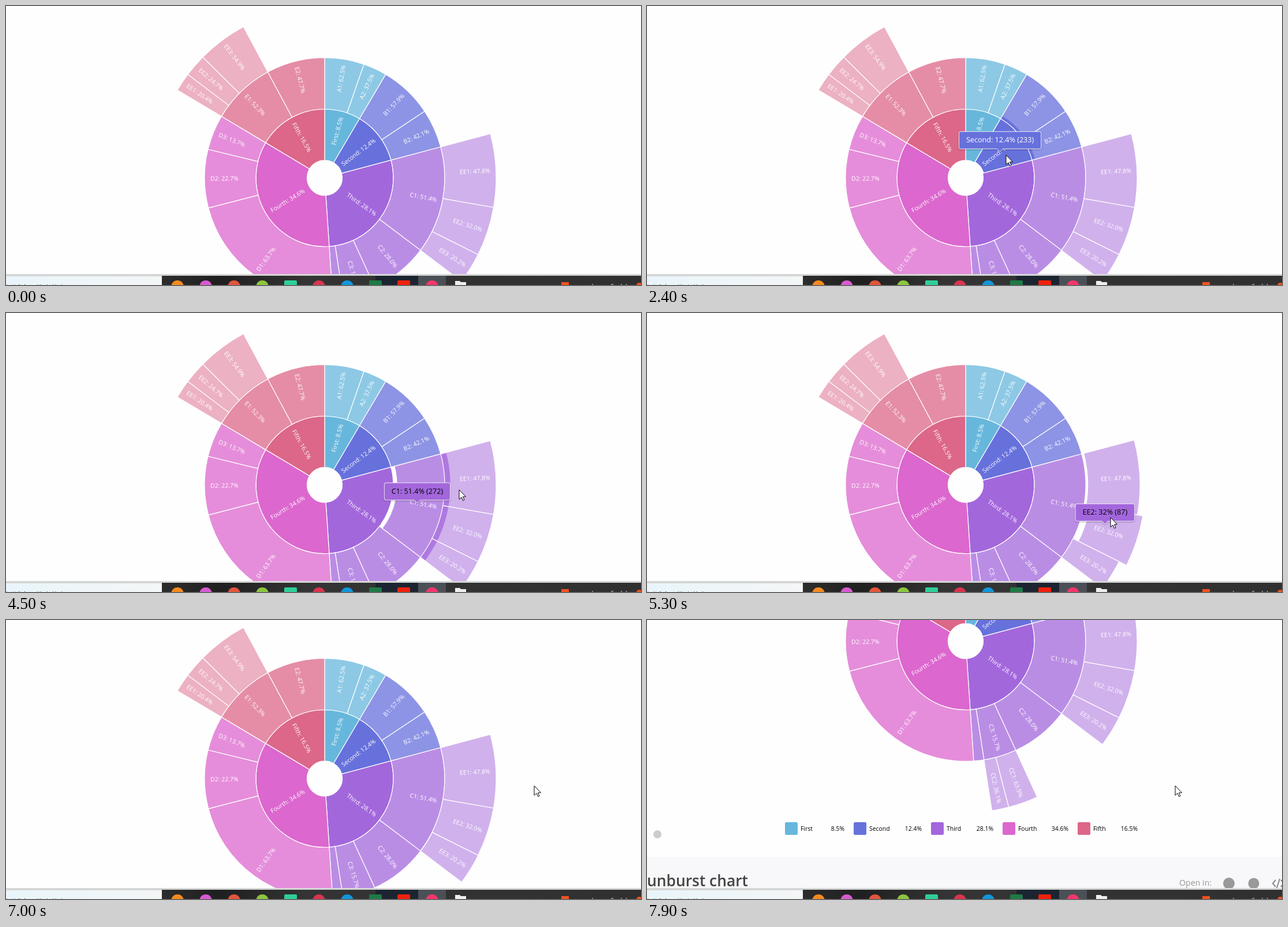
Animation of 1100x483 px, one loop 8 s. Source, as an HTML page:

```html
<!DOCTYPE html>
<html lang="en">
<head>
<meta charset="utf-8">
<title>Sunburst chart</title>
<style>
html, body { margin: 0; width: 100%; height: 100%; overflow: hidden; background: #fefefe; }
svg { display: block; width: 100%; height: 100%; font-family: "Open Sans", "Noto Sans", sans-serif; }
.slice { stroke: #fff; stroke-width: 1.2; }
.label { fill: #fff; font-size: 10.5px; }
.legend { fill: #000; font-size: 10.4px; }
.tip { font-size: 12.6px; text-anchor: middle; }
.tip path { stroke: #fff; stroke-opacity: .9; filter: drop-shadow(0 1px 1px rgba(0, 0, 0, .3)); }
.title { font-size: 26.4px; font-weight: 600; fill: #444; text-anchor: end; }
.open { font-size: 14.2px; fill: #999; }
.task { font: 13px "Noto Sans CJK SC", "Noto Sans CJK", sans-serif; fill: #222; }
</style>
</head>
<body>
<svg id="stage" viewBox="0 0 1100 483">
  <defs>
    <linearGradient id="bar">
      <stop offset="0" stop-color="#2d2d2d"/><stop offset=".12" stop-color="#1f1f1f"/>
      <stop offset=".3" stop-color="#343434"/><stop offset="1" stop-color="#303030"/>
    </linearGradient>
    <linearGradient id="pane">
      <stop offset="0" stop-color="#e9f5fa"/><stop offset="1" stop-color="#f4f6f7"/>
    </linearGradient>
  </defs>
  <g id="page">
    <g id="footer">
      <rect y="671" width="1100" height="200" fill="#f8f7f9"/>
      <text class="title" x="175" y="722">Sunburst chart</text>
      <text class="open" x="922" y="721">Open in:</text>
      <circle cx="1008" cy="717" r="10" fill="#999"/>
      <circle cx="1051" cy="717" r="9.5" fill="#999"/>
      <path d="M1089 711l-5 6 5 6M1096 709l-5 16M1098 711l5 6-5 6" fill="none" stroke="#888" stroke-width="2"/>
    </g>
    <circle cx="18" cy="632" r="7" fill="#ccc"/>
    <g id="legend"></g>
    <g id="rings"></g>
    <g id="labels"></g>
    <g id="tips"></g>
  </g>
  <g id="taskbar">
    <rect y="464" width="1100" height="19" fill="#d5d7d6"/>
    <rect y="468" width="270" height="15" fill="url(#pane)"/>
    <text class="task" x="0" y="492.5">测试全下推小体主页</text>
    <rect x="270" y="467" width="830" height="16" fill="url(#bar)"/>
    <rect x="640" y="467" width="74" height="16" fill="#1b2430"/>
    <rect x="714" y="467" width="48" height="16" fill="#4b5057"/>
  </g>
  <path id="cursor" d="M0 0V16.5L4 13L6.5 18.7L9 17.6L6.5 12H11.5Z" fill="#fff" stroke="#000"/>
</svg>
<script>
const LOOP = 8000, STEP = 100;
const CX = 552, CY = 297.5, RADII = [30.5, 119, 208, 297];

const data = [
  ["First", [["A1", 100], ["A2", 60]], "#67b7dc", "#000"],
  ["Second", [["B1", 135], ["B2", 98]], "#6771dc", "#fff"],
  ["Third", [["C1", [["EE1", 130], ["EE2", 87], ["EE3", 55]]], ["C2", 148],
    ["C3", [["CC1", 53], ["CC2", 30]]], ["C4", 26]], "#a367dc", "#000"],
  ["Fourth", [["D1", 415], ["D2", 148], ["D3", 89]], "#dc67ce", "#000"],
  ["Fifth", [["E1", [["EE1", 33], ["EE2", 40], ["EE3", 89]]], ["E2", 148]], "#dc6788", "#fff"]
];

// slice key, start, end
const hovers = [
  ["SecondB1", 300, 900], ["Second", 900, 2700], ["Third", 2700, 3600],
  ["ThirdC1", 3600, 4500], ["C1EE1", 4500, 5000], ["C1EE2", 5000, 5700], ["C1EE3", 5700, 6300]
];

// time, x, y of the pointer tip
const pointer = [
  [100, 936, 112], [200, 755, 152], [400, 696, 166], [700, 672, 195], [800, 656, 232],
  [900, 656, 232], [1100, 651, 249], [1800, 651, 250], [1900, 650, 251], [2100, 650, 251],
  [2400, 622, 258], [2500, 618, 262], [2600, 618, 262], [2700, 622, 300], [3500, 668, 299],
  [3600, 700, 298], [3700, 715, 298], [4400, 740, 300], [4500, 785, 306], [4900, 800, 326],
  [5000, 803, 347], [5300, 803, 354], [5600, 790, 385], [5700, 775, 411], [6200, 768, 428],
  [6300, 825, 398], [6500, 888, 325], [6700, 903, 303], [6900, 915, 287]
];

const scrolls = [
  [0, 0], [7000, 23], [7100, 78], [7200, 100], [7400, 175],
  [7500, 195], [7600, 200], [7800, 224], [7900, 261]
];

const $ = id => document.getElementById(id);
const clamp = v => Math.max(0, Math.min(1, v));
const easeOut = v => 1 - (1 - clamp(v)) ** 3;
const mix = (a, b, k) => a + (b - a) * k;
const sum = v => Array.isArray(v) ? v.reduce((s, [, w]) => s + sum(w), 0) : v;

function add(parent, tag, attrs, text) {
  const el = document.createElementNS("http://www.w3.org/2000/svg", tag);
  for (const k in attrs) el.setAttribute(k, attrs[k]);
  if (text) el.textContent = text;
  return parent.appendChild(el);
}

const total = sum(data);
const slices = {};
const rings = [0, 1, 2].map(() => add($("rings"), "g", {}));

function polar(value, r) {
  const a = value / total * 2 * Math.PI;
  return [r * Math.sin(a), -r * Math.cos(a)];
}

function arcPath(from, to, r0, r1) {
  const big = to - from > total / 2 ? 1 : 0;
  return `M${polar(from, r0)}L${polar(from, r1)}A${r1} ${r1} 0 ${big} 1 ${polar(to, r1)}` +
    `L${polar(to, r0)}A${r0} ${r0} 0 ${big} 0 ${polar(from, r0)}Z`;
}

function addLabel(text, mid, r) {
  const angle = mid / total * 360, right = angle < 180;
  add($("labels"), "text", {
    class: "label", dy: ".35em", x: right ? r : -r, "text-anchor": right ? "end" : "start",
    transform: `translate(${CX} ${CY}) rotate(${angle + (right ? -90 : 90)})`
  }, text);
}

function build(nodes, level, start, parent, color, ink) {
  const whole = sum(nodes);
  for (const [name, value, ownColor = color, ownInk = ink] of nodes) {
    const size = sum(value), mid = start + size / 2;
    const r0 = RADII[level], r1 = RADII[level + 1], pct = (size / whole * 100).toFixed(1);
    const [x, y] = polar(mid, (r0 + r1) / 2);
    const el = add(rings[level], "path", {
      class: "slice", d: arcPath(start, start + size, r0, r1),
      fill: ownColor, "fill-opacity": 1 - level * .25
    });
    slices[parent + name] = {
      el, level, x: CX + x, y: CY + y, color: ownColor, ink: ownInk,
      tip: `${name}: ${+pct}% (${size})`
    };
    if (size > 28) addLabel(`${name}: ${pct}%`, mid, r1 - 10);
    if (Array.isArray(value)) build(value, level + 1, start, name, ownColor, ownInk);
    start += size;
  }
}
build(data, 0, 0, "", "", "");

[239, 358, 492, 616, 746].forEach((x, i) => {
  const [name, parts, fill] = data[i], end = [342, 476, 600, 730, 850][i];
  add($("legend"), "rect", { x, y: 611, width: 22, height: 22, rx: 2.5, fill });
  add($("legend"), "text", { class: "legend", x: x + 27, y: 626 }, name);
  add($("legend"), "text", { class: "legend", x: end, y: 626, "text-anchor": "end" },
    (sum(parts) / total * 100).toFixed(1) + "%");
});

["#f58a1f", "#d65bd0", "#e2553d", "#8cc63f", "#2fcf9a", "#d8344f", "#1296db", "#1f7a45", "#f0210c", "#f5366b"]
  .forEach((fill, i) => {
    const cx = 297 + i * 49;
    if ([4, 7, 8].includes(i)) add($("taskbar"), "rect", { x: cx - 11, y: 475, width: 22, height: 22, rx: 2, fill });
    else add($("taskbar"), "circle", { cx, cy: 486, r: 11, fill });
  });
add($("taskbar"), "path", { d: "M778 476h8l2 2h9v10h-19z", fill: "#eee" });
add($("taskbar"), "rect", { x: 962, y: 478, width: 13, height: 12, fill: "#f4511e" });
add($("taskbar"), "circle", { cx: 1097, cy: 484, r: 5, fill: "#f4511e" });
add($("taskbar"), "path", { d: "M1016 481v3M1048 483l4-2M1066 481v3M1074 481l2 3", stroke: "#ddd" });

const tips = [0, 1, 2].map(() => {
  const g = add($("tips"), "g", { class: "tip" });
  return { g, box: add(g, "path", {}), text: add(g, "text", { y: -16 }) };
});

function drawTip(level, t) {
  const { g, box, text } = tips[level];
  const list = hovers.filter(([key]) => slices[key].level === level);
  const i = list.findLastIndex(h => h[1] <= t);
  if (i < 0) return g.setAttribute("opacity", 0);
  const [key, start, end] = list[i], s = slices[key];
  const before = list[i - 1], slides = before && before[2] === start;
  const from = slides ? slices[before[0]] : s, k = easeOut((t - start) / 600);
  const shown = slides ? 1 : clamp((t - start) / 400);
  g.setAttribute("opacity", shown * (1 - clamp((t - end) / 400)));
  g.setAttribute("transform", `translate(${mix(from.x, s.x, k)} ${mix(from.y, s.y, k)})`);
  text.textContent = s.tip;
  text.setAttribute("fill", s.ink);
  const w = text.getComputedTextLength() / 2 + 12.5;
  box.setAttribute("fill", s.color);
  box.setAttribute("d", `M${3 - w} -35H${w - 3}q3 0 3 3V-8q0 3 -3 3H5L0 0L-5 -5H${3 - w}q-3 0 -3 -3V-32q0 -3 3 -3Z`);
}

function drawPointer(t) {
  const i = pointer.findLastIndex(p => p[0] <= t);
  $("cursor").setAttribute("visibility", i < 0 ? "hidden" : "visible");
  if (i < 0) return;
  const a = pointer[i], b = pointer[i + 1] || a;
  const k = b === a ? 0 : (t - a[0]) / (b[0] - a[0]);
  $("cursor").setAttribute("transform", `translate(${mix(a[1], b[1], k)} ${mix(a[2], b[2], k)})`);
}

function draw(t) {
  for (const [key, start, end] of hovers) {
    const grow = easeOut((t - start) / 400) * (1 - easeOut((t - end) / 1000));
    slices[key].el.setAttribute("transform", `translate(${CX} ${CY}) scale(${1 + .05 * grow})`);
  }
  tips.forEach((_, level) => drawTip(level, t));
  drawPointer(t);
  const scroll = scrolls.findLast(s => s[0] <= t)[1];
  $("page").setAttribute("transform", `translate(0 ${-scroll})`);
}

for (const { el } of Object.values(slices)) el.setAttribute("transform", `translate(${CX} ${CY})`);

const begin = performance.now();
function tick() {
  const t = (performance.now() - begin) % LOOP;
  draw(Math.floor(t / STEP) * STEP);
  requestAnimationFrame(tick);
}
tick();
</script>
</body>
</html>
```
